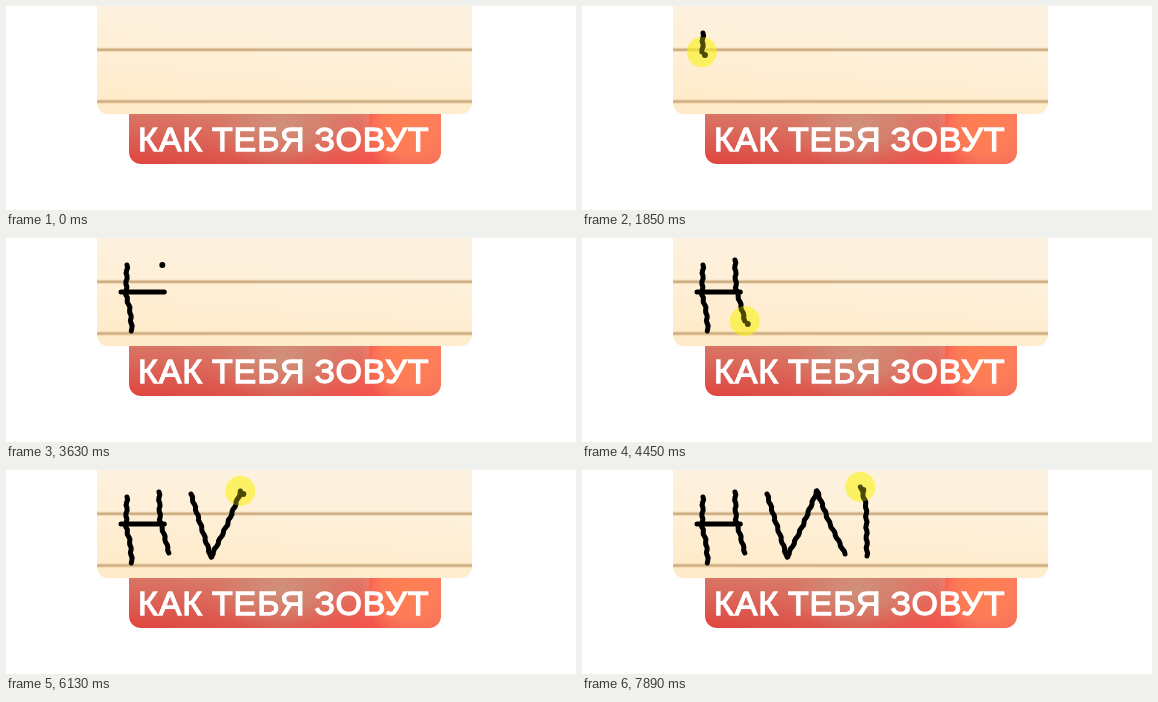
Write an HTML page that moves like this. It is 570x204 px and loops after 7.99 s.

```html
<!DOCTYPE html>
<html lang="ru">
<head>
<meta charset="utf-8">
<style>
html, body { margin: 0; width: 100%; height: 100%; overflow: hidden; background: #fff; }
svg { display: block; width: 570px; height: 204px; }
text { font: 34px "Liberation Sans", Arial, sans-serif; letter-spacing: .9px; word-spacing: -1.4px; }
.ink polyline { fill: none; stroke: #000; stroke-width: 5; stroke-linecap: round; stroke-linejoin: round; }
</style>
</head>
<body>
<svg viewBox="0 0 570 204">
  <defs>
    <linearGradient id="paper" x1="0" y1="1" x2=".25" y2="0">
      <stop offset="0" stop-color="#feeac6"/>
      <stop offset=".5" stop-color="#feeed4"/>
      <stop offset="1" stop-color="#fdf2e0"/>
    </linearGradient>
    <linearGradient id="red">
      <stop offset="0" stop-color="#df4440"/>
      <stop offset=".5" stop-color="#dc5a4e"/>
      <stop offset=".75" stop-color="#f2524a"/>
      <stop offset="1" stop-color="#f9745c"/>
    </linearGradient>
    <linearGradient id="haze" x2="0" y2="1">
      <stop offset="0" stop-color="#d6917c" stop-opacity=".65"/>
      <stop offset="1" stop-color="#d6917c" stop-opacity="0"/>
    </linearGradient>
    <radialGradient id="tan">
      <stop offset="0" stop-color="#cf9680" stop-opacity=".8"/>
      <stop offset=".5" stop-color="#cf8c76" stop-opacity=".6"/>
      <stop offset="1" stop-color="#d67a68" stop-opacity="0"/>
    </radialGradient>
    <radialGradient id="orange">
      <stop offset="0" stop-color="#ff8052"/>
      <stop offset=".6" stop-color="#ff8058" stop-opacity=".8"/>
      <stop offset="1" stop-color="#ff8062" stop-opacity="0"/>
    </radialGradient>
    <clipPath id="tag"><path d="M123 108H435V146a12 12 0 0 1-12 12H135a12 12 0 0 1-12-12Z"/></clipPath>
  </defs>
  <path d="M91 0H466V97a11 11 0 0 1-11 11H102a11 11 0 0 1-11-11Z" fill="url(#paper)"/>
  <g stroke="#c6a273">
    <path d="M91 43.8H466M91 95.4H466" stroke-width="4" opacity=".35"/>
    <path d="M91 43.8H466M91 95.4H466" stroke-width="2" opacity=".8"/>
  </g>
  <g clip-path="url(#tag)">
    <path d="M123 108h312v50H123z" fill="url(#red)"/>
    <path d="M123 108h240v50H123z" fill="url(#haze)"/>
    <ellipse cx="275" cy="120" rx="75" ry="42" fill="url(#tan)"/>
    <ellipse cx="402" cy="122" rx="48" ry="44" fill="url(#orange)"/>
  </g>
  <text x="132" y="144.5" fill="#fff" stroke="#fff" stroke-width="1.3">КАК ТЕБЯ ЗОВУТ</text>
  <circle id="glow" r="15" fill="#fcf214" opacity=".43"/>
  <g id="ink" class="ink"></g>
  <circle id="dot" r="3"/>
  <circle id="veil" r="15" fill="#fcf214" opacity=".3"/>
</svg>
<script>
const LOOP = 7990, START = 360, TICK = 92.9;   // the pointer moves once per tick

const get = id => document.getElementById(id);
const clamp = v => Math.max(0, Math.min(1, v));
const lerp = (a, b, k) => ({ x: a.x + (b.x - a.x) * k, y: a.y + (b.y - a.y) * k });
const easeOut = k => 1 - (1 - k) ** 2;
const show = (el, on) => el.setAttribute("visibility", on ? "visible" : "hidden");

// Joins the key points with a slightly shaky hand
function shaky(keys) {
  const pts = [keys[0]];
  for (let i = 1; i < keys.length; i++) {
    const a = keys[i - 1], b = keys[i];
    const n = Math.ceil(Math.hypot(b.x - a.x, b.y - a.y) / 3);
    for (let j = 1; j <= n; j++) {
      const p = lerp(a, b, j / n);
      pts.push({ x: p.x + .7 * Math.sin(pts.length * 1.7), y: p.y });
    }
  }
  return pts.map(p => p.x + "," + p.y).join(" ");
}

function stroke(from, to, path) {
  const keys = path.split(" ").map(s => {
    const [x, y] = s.split(",").map(Number);
    return { x, y };
  });
  const line = document.createElementNS("http://www.w3.org/2000/svg", "polyline");
  line.setAttribute("points", shaky(keys));
  get("ink").append(line);
  const len = line.getTotalLength();
  return { from, to, line, len, at: k => line.getPointAtLength(len * k) };
}

// First tick, last tick, key points
const strokes = [
  stroke(14, 21, "121,27 120,57 124,72 126,93"),
  stroke(26, 32, "115,54 158,54"),
  stroke(36, 44, "153,22 154,50 163,83"),
  stroke(46, 54, "185,24 194,53 205,87"),
  stroke(54, 62, "205,87 221,55 235,21"),
  stroke(64, 71, "235,21 247,52 263,84"),
  stroke(74, 81, "285,86 284,35 279,17")
];
const ENTRY = { x: 194, y: 197 }, REST = { x: 114, y: 39 }, REST_TICK = 4;

function pen(n) {
  if (n <= REST_TICK) return { p: lerp(ENTRY, REST, n / REST_TICK), down: false };
  let last = REST, left = REST_TICK;
  for (const s of strokes) {
    const first = s.at(0);
    if (n <= s.from) {
      const joined = Math.hypot(first.x - last.x, first.y - last.y) < 2;
      return { p: lerp(last, first, easeOut((n - left) / (s.from - left))), down: joined };
    }
    if (n <= s.to) return { p: s.at((n - s.from) / (s.to - s.from)), down: true };
    last = s.at(1);
    left = s.to;
  }
  return { p: last, down: true };
}

function place(id, p, shift, on) {
  const el = get(id);
  el.setAttribute("cx", p.x + shift);
  el.setAttribute("cy", p.y + shift);
  show(el, on);
}

function draw(time) {
  const n = Math.floor((time - START) / TICK + .1);
  for (const s of strokes) {
    const k = clamp((n - s.from) / (s.to - s.from));
    show(s.line, k > 0);
    s.line.setAttribute("stroke-dasharray", k < 1 ? `${s.len * k} 999` : "none");
  }
  const { p, down } = pen(Math.max(0, n));
  place("glow", p, 0, down);
  place("veil", p, 0, down);
  place("dot", p, 3, n >= 0);
}

const begin = performance.now();
function frame() {
  draw((performance.now() - begin) % LOOP);
  requestAnimationFrame(frame);
}
frame();
</script>
</body>
</html>
```
